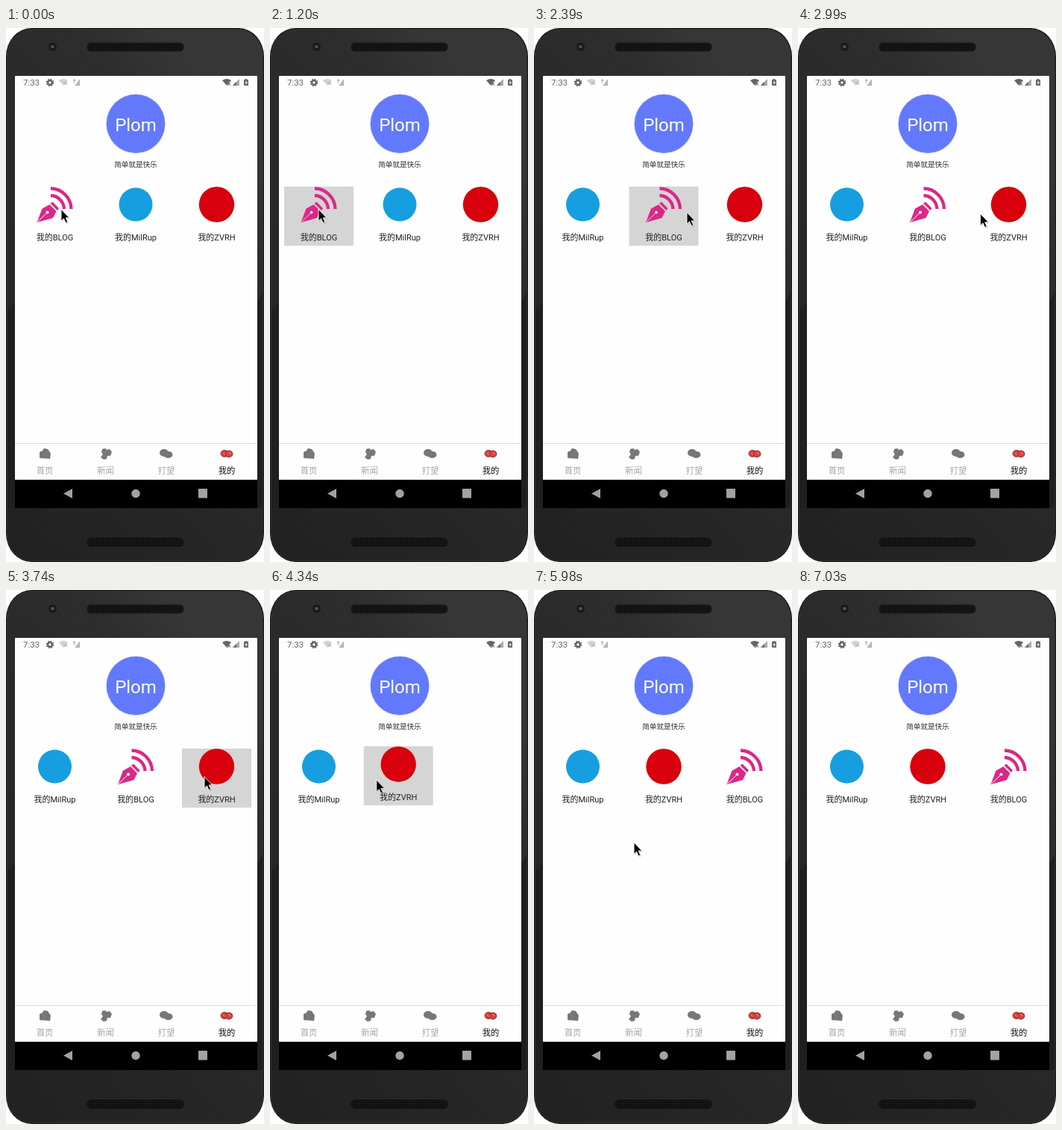
An HTML page that plays this animation: 346x714 px, repeating every 7330 ms.

```html
<!DOCTYPE html>
<html lang="zh-CN">
<head>
<meta charset="utf-8">
<title>Drag to reorder</title>
<style>
  html, body { margin: 0; width: 100%; height: 100%; overflow: hidden; background: #fff; }
  svg { display: block; width: 346px; height: 714px; }
  text { font-family: Roboto, "Noto Sans CJK SC", "Noto Sans CJK", sans-serif; text-anchor: middle; }
  .item { --bg: #fefefe; }
  .item.held { --bg: #d5d5d5; }
  .item > rect { fill: none; }
  .item.held > rect { fill: var(--bg); }
  .item text { font-size: 11px; fill: #222; }
  .tab { font-size: 11.3px; fill: #a3a3a3; }
  .tab.on { fill: #111; }
</style>
</head>
<body>
<svg viewBox="0 0 346 714">
  <defs>
    <linearGradient id="body" x1="0" y1="1" x2=".6" y2="0">
      <stop offset="0" stop-color="#212121"/>
      <stop offset=".85" stop-color="#2d2d2d"/>
      <stop offset="1" stop-color="#363636"/>
    </linearGradient>
    <pattern id="mesh" width="3" height="3" patternUnits="userSpaceOnUse">
      <rect width="3" height="3" fill="#222"/>
      <circle cx="1.5" cy="1.5" r="1.2" fill="#060606"/>
    </pattern>
  </defs>

  <!-- phone -->
  <rect width="346" height="714" rx="34" ry="38" fill="#191919"/>
  <rect x="1.5" y="1.5" width="343" height="711" rx="33" ry="37" fill="url(#body)" stroke="#303030"/>
  <path d="M2 376L12 366V642H2zM337 366L344 354V642H337z" fill="#1f1f1f"/>
  <circle cx="62.5" cy="25" r="5.5" fill="#191919"/>
  <circle cx="62.5" cy="25" r="2.3" fill="#505050"/>
  <rect x="109" y="20" width="129" height="11" rx="5" fill="url(#mesh)" stroke="#161616"/>
  <rect x="109" y="682" width="129" height="11" rx="5" fill="url(#mesh)" stroke="#111"/>
  <rect x="12" y="64" width="325" height="540" fill="#fefefe"/>
  <rect x="12" y="604" width="325" height="38"/>

  <!-- status bar -->
  <g fill="#666">
    <text x="34" y="77" font-size="11.5">7:33</text>
    <circle cx="59" cy="73" r="3" fill="none" stroke="#666" stroke-width="2.4"/>
    <circle cx="59" cy="73" r="4.5" fill="none" stroke="#666" stroke-width="1.6" stroke-dasharray="1.8 1.734"/>
    <path d="M71 70Q77 66 83 70L77 77z" fill="#d2d2d2"/>
    <path d="M78 72l4 4M82 72l-4 4" stroke="#aaa"/>
    <text x="91.5" y="74" font-size="8">?</text>
    <path d="M92 77L99 69V77z" fill="#d0d0d0"/>
    <path d="M94 77V75M96 77V72M98 77V69" stroke="#888" stroke-width=".8"/>
    <path d="M290 70Q296 66 302 70L296 77z"/>
    <path d="M297 73l4 4M301 73l-4 4" stroke="#666"/>
    <path d="M304 77L313 68V77z" fill="#aaa"/>
    <path d="M304 77L309 72V77z"/>
    <path d="M319 69h2v-1h2v1h2v8h-6z"/>
    <path d="M322.5 70l-2 3.5h1.5l-.5 3 2.5-4h-1.7z" fill="#fff"/>
  </g>

  <!-- profile -->
  <circle cx="174" cy="128" r="40.5" fill="#eef0f6"/>
  <circle cx="174" cy="128" r="39.3" fill="#6379fd"/>
  <text x="174" y="137.5" font-size="24" fill="#fff">Plom</text>
  <text x="174" y="186" font-size="9.6" fill="#333">简单就是快乐</text>

  <!-- tab bar -->
  <path d="M12 555.5H337" stroke="#dcdcdc"/>
  <g fill="#777">
    <path d="M45 575L45 567L49 565L51 562L56 563L60 569L59 576z"/>
    <path d="M129 563l4-1 2 2 4-1 3 4-2 5-4 0-1 4-4 1-4-3 3-4-2-3z"/>
    <ellipse cx="212" cy="568" rx="6" ry="5"/>
    <ellipse cx="217.5" cy="570.5" rx="6" ry="4.5"/>
  </g>
  <g fill="#d8403a" stroke="#6b3030" stroke-width=".8">
    <ellipse cx="293" cy="569" rx="5" ry="4.5"/>
    <ellipse cx="299" cy="569.5" rx="5" ry="4.5"/>
  </g>
  <path d="M291 568l3 2M299 567l2 3" stroke="#f3a09a"/>
  <text class="tab" x="52" y="596">首页</text>
  <text class="tab" x="133.5" y="596">新闻</text>
  <text class="tab" x="215" y="596">打望</text>
  <text class="tab on" x="296" y="596">我的</text>

  <!-- navigation bar -->
  <g fill="#a2a2a2">
    <path d="M77 622.5L89 616V629z"/>
    <circle cx="174" cy="622.5" r="5.7"/>
    <rect x="258" y="616" width="12" height="12.5" rx="1"/>
  </g>

  <!-- draggable items, 93 by 79 each -->
  <g id="items">
    <g class="item" id="kit">
      <rect width="93" height="79"/>
      <circle cx="46.5" cy="24" r="22.5" fill="#169fe0"/>
      <text x="46.5" y="72">我的MilRup</text>
    </g>
    <g class="item" id="blog">
      <rect width="93" height="79"/>
      <path d="M41 2.5A28 28 0 0 1 68.5 30M41 12A18.500 18.500 0 0 1 59 30" fill="none" stroke="#da2887" stroke-width="4.3"/>
      <path d="M22.5 48L29.5 29.5L39.500 24L48.5 33L44 42z" fill="#da2887"/>
      <path d="M40.5 22.5L43.5 20.5L52 29L50 32z" fill="#da2887"/>
      <path d="M23.5 47L36 35" stroke="var(--bg)"/>
      <circle cx="36.5" cy="34.5" r="2" fill="var(--bg)"/>
      <text x="46.5" y="72">我的BLOG</text>
    </g>
    <g class="item" id="club">
      <rect width="93" height="79"/>
      <circle cx="46.5" cy="24" r="23.7" fill="#d8000c"/>
      <text x="46.5" y="72">我的ZVRH</text>
    </g>
  </g>

  <g id="cursor">
    <path d="M1 1.5V17l3.5-3 2.5 6 3-1.3-2.5-5.7H12z" opacity=".2"/>
    <path d="M0 .5V16l3.5-3.2 2.5 5.7 2.7-1.2-2.5-5.5H11z" stroke="#fff" stroke-width=".9"/>
  </g>
</svg>

<script>
const LOOP = 7330, LAST = 7030, STEP = 150, TOP = 212;
const $ = id => document.getElementById(id);
const list = $("items");
const slot = i => [19 + 108.5 * i, TOP];

// Each move is [start ms, end ms, [x, y]]; things rest between moves
const pointer = {
  el: $("cursor"), home: [74, 242],
  moves: [
    [0, 150, [61, 242]],
    [1050, 1200, [65, 242]],
    [1200, 2090, [205, 246]],
    [2540, 3290, [266, 249]],
    [4040, 4480, [104, 255]],
    [4790, 5230, [146, 245]],
    [5230, 5680, [126, 316]],
    [5830, 6880, [271, 697]]
  ]
};

// A dragged item overshoots its new slot, then settles into it
const items = [
  { el: $("kit"), home: slot(1), moves: [[2000, 2390, slot(0)]] },
  {
    el: $("blog"), home: slot(0), grab: 1200, drop: 2540,
    moves: [[1200, 2060, [161, 217]], [2060, 2390, slot(1)], [4340, 4640, slot(2)]]
  },
  {
    el: $("club"), home: slot(2), grab: 3740, drop: 5680,
    moves: [[4040, 4480, [91, 208]], [4790, 5530, slot(1)]]
  }
];

const clamp = k => Math.min(1, Math.max(0, k));
const ease = k => k * k * (3 - 2 * k);

function place({ el, home, moves }, t) {
  const pos = moves.reduce((p, [start, end, to]) => {
    const k = ease(clamp((t - start) / (end - start)));
    return p.map((v, i) => v + (to[i] - v) * k);
  }, home);
  el.setAttribute("transform", `translate(${pos})`);
}

function draw(t) {
  for (const item of items) {
    const { el, grab, drop } = item;
    const held = t >= grab && t < drop;
    el.classList.toggle("held", held);
    if (held && list.lastElementChild !== el) list.appendChild(el);
    place(item, t);
  }
  place(pointer, t);
  pointer.el.style.display = t < LAST ? "" : "none";
}

// The screen refreshes every STEP, 10 ms sooner after 1200 and 5090
function refresh(now) {
  const skew = now < 1340 ? 0 : now < 5230 ? 10 : 20;
  return Math.min(LAST, Math.floor((now + skew) / STEP) * STEP - skew);
}

const start = performance.now();
function loop() {
  draw(refresh((performance.now() - start) % LOOP));
  requestAnimationFrame(loop);
}
loop();
</script>
</body>
</html>
```
